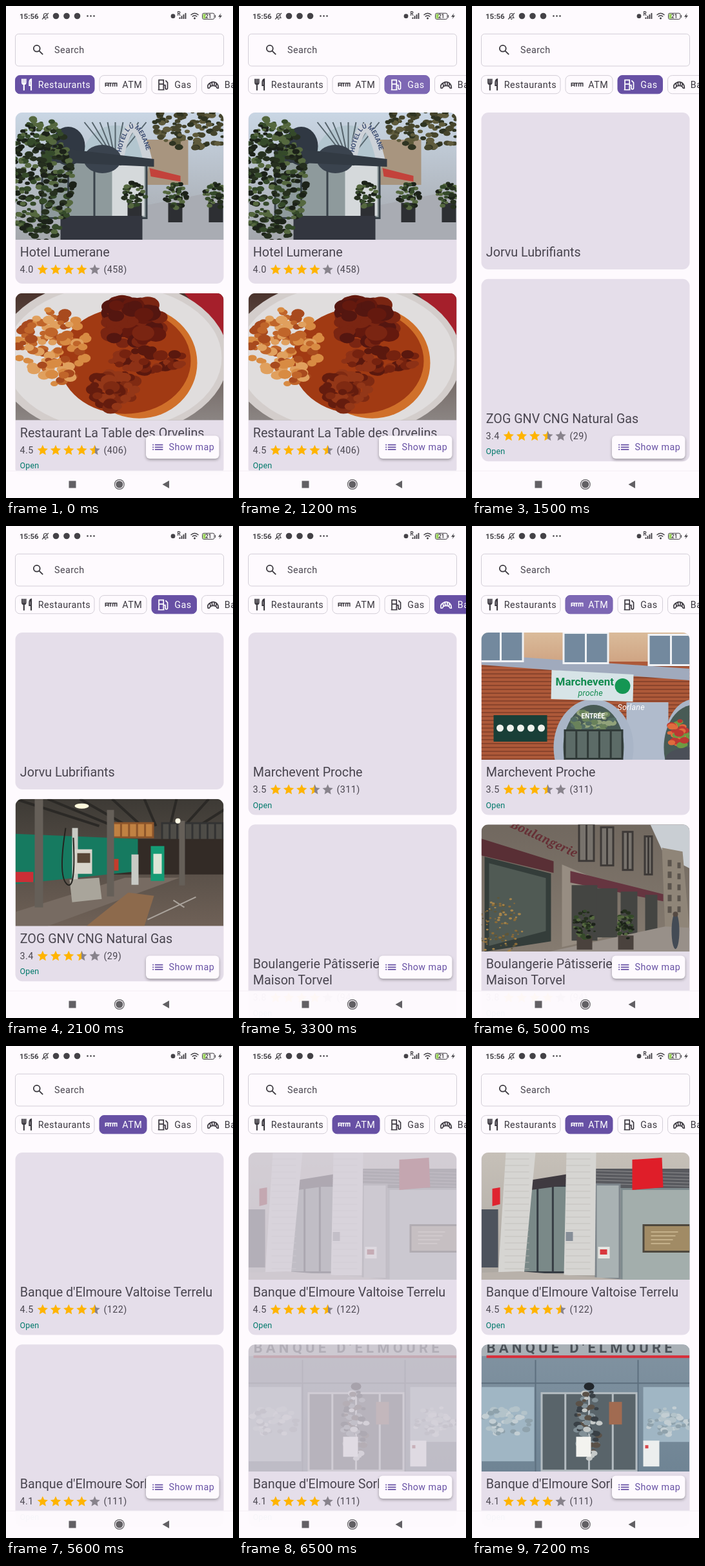
An HTML page that plays this animation: 352x762 px, repeating every 8000 ms.

```html
<!DOCTYPE html>
<html lang="en">
<head>
<meta charset="utf-8">
<title>Places nearby</title>
<style>
html, body { margin: 0; width: 100%; height: 100%; overflow: hidden; background: #fefafe; }
svg { display: block; width: 100vw; height: 100vh; }
text { font-family: Roboto, Arial, sans-serif; white-space: pre; }
.body { font-size: 14.3px; letter-spacing: .45px; }
.title { font-size: 19.7px; }
.small { font-size: 12.5px; letter-spacing: .2px; }
.status { font-size: 11.5px; font-weight: 700; }
.tiny { font-size: 8.2px; font-weight: 700; }
.sign { font-size: 17px; font-weight: 700; }
.arch { font-size: 10px; font-weight: 700; }
.script { font: italic 700 18px "Noto Serif", serif; }
.chip { color: #3b383f; }
.chip.on { color: #fff; }
.chip .bg { fill: #fefafe; stroke: #d3ced7; }
.chip.on .bg { fill: #6750a4; stroke: #6750a4; }
</style>
</head>
<body>
<svg id="stage" viewBox="0 0 352 762" xmlns="http://www.w3.org/2000/svg"></svg>
<script>
const INK = '#49454f', DARK = '#444247', PURPLE = '#6750a4', PAPER = '#fefafe', EDGE = '#d3ced7';
const CARD = '#e5deea', GOLD = '#ffb400', GREY = '#88838c', NAV = '#626064';
const CARD_W = 323, PHOTO_H = 197, LEFT = 14.5;

// Shape helpers, each returning SVG markup
const rect = (x, y, w, h, fill, more = '') =>
  `<rect x="${x}" y="${y}" width="${w}" height="${h}" fill="${fill}" ${more}/>`;
const poly = (pts, fill) => `<polygon points="${pts}" fill="${fill}"/>`;
const oval = (x, y, rx, ry, fill) => `<ellipse cx="${x}" cy="${y}" rx="${rx}" ry="${ry}" fill="${fill}"/>`;
const disc = (x, y, r, fill) => oval(x, y, r, r, fill);
const line = (d, stroke, width = 1) => `<path d="${d}" fill="none" stroke="${stroke}" stroke-width="${width}"/>`;
const text = (x, y, s, fill, cls, more = '') => `<text x="${x}" y="${y}" fill="${fill}" class="${cls}" ${more}>${s}</text>`;
const at = (x, y, inner) => `<g transform="translate(${x} ${y})">${inner}</g>`;
const rows = (n, draw) => Array.from({ length: n }, (_, i) => draw(i)).join('');
const icon = (x, y, d, width = 1.9) =>
  `<g transform="translate(${x} ${y}) scale(.896) translate(-12 -12)">${line(d, 'currentColor', width)}</g>`;

let seed = 7;
const rnd = () => (seed = seed * 16807 % 2147483647) / 2147483647;
// Ovals scattered inside an elliptic area
const scatter = (n, x, y, rx, ry, size, fills) => rows(n, i => {
  const a = rnd() * 6.283, d = Math.sqrt(rnd()), s = size * (.6 + rnd() * .7);
  return oval((x + Math.cos(a) * d * rx).toFixed(1), (y + Math.sin(a) * d * ry).toFixed(1),
    s.toFixed(1), (s * .7).toFixed(1), fills[i % fills.length]);
});
const LEAVES = ['#26301f', '#354a2a', '#1c2219', '#55683f'];

let gradients = 0;
const backdrop = (top, bottom) => {
  const id = 'sky' + gradients++;
  return `<linearGradient id="${id}" x2="0" y2="1"><stop stop-color="${top}"/><stop offset="1" stop-color="${bottom}"/></linearGradient>` +
    rect(0, 0, CARD_W, PHOTO_H, `url(#${id})`);
};
// A frame split into equal panes
const panes = (x, y, w, h, n, frame, glass) => rect(x, y, w, h, frame) +
  rows(n, i => rect(x + 3 + i * (w - 3) / n, y + 3, (w - 3) / n - 3, h - 6, glass));

// Photos, in a few flat shapes
const hotel = () => backdrop('#c9d6e4', '#a4a7ac') +
  rect(203, 42, 65, 70, '#a8957f') +
  poly('120,197 195,145 323,120 323,197', '#a9acb3') +
  oval(155, 75, 52, 55, '#b3c6cf') + rows(9, i => line(`M155 75l${-48 + i * 12} -60`, '#56646c', 2)) +
  line('M162 66Q183 -26 207 82', '#cdd2d8', 14) +
  `<path id="arch" d="M164 62Q183 -22 210 82" fill="none"/>
   <text class="arch" fill="#3e4f74"><textPath href="#arch">HOTEL LUMERANE</textPath></text>` +
  panes(40, 75, 165, 90, 4, '#39434a', '#8e9a9c') + rect(150, 82, 50, 78, '#d5d9db') +
  oval(82, 52, 26, 30, '#303843') + oval(135, 72, 29, 22, '#3a434e') + poly('40,52 215,72 215,84 40,76', '#323a43') +
  poly('208,86 256,98 256,107 210,99', '#c3423b') +
  scatter(160, 280, 15, 70, 42, 5, ['#46452c', '#2f3422', '#5f5b3c']) +
  rows(3, i => rect(174 + i * 63, 140, 22, 30, '#2d2f33') + scatter(45, 185 + i * 63, 128, 18, 20, 4, LEAVES)) +
  rect(70, 160, 127, 37, '#33363f') + scatter(340, 38, 105, 52, 98, 5, LEAVES);

const stew = () => backdrop('#4a332c', '#8b8583') + poly('262,0 323,0 323,70', '#a51f2b') +
  oval(150, 100, 180, 122, '#d3cdcb') + oval(152, 100, 168, 112, '#e0dddd') +
  oval(192, 108, 90, 86, '#d0702a') + oval(170, 105, 102, 82, '#a13a13') +
  scatter(110, 58, 85, 56, 60, 8, ['#d88b43', '#c0652a', '#e0a05e', '#a84a1e']) +
  scatter(70, 180, 45, 46, 34, 14, ['#64190e', '#7a2512', '#541610']) +
  scatter(60, 205, 105, 58, 18, 9, ['#75220f', '#8d3116', '#5a180e']) +
  scatter(60, 152, 148, 34, 32, 10, ['#7f2a12', '#933718', '#641c0e']);

const pumps = () => backdrop('#3d3a35', '#6f6157') +
  rows(8, i => line(`M${i * 50} 0L${130 + i * 22} 42`, '#2b2926', 4)) +
  panes(150, 36, 65, 25, 5, '#8c552b', '#c08142') + panes(226, 36, 97, 30, 8, '#333', '#4e4c47') +
  rect(150, 62, 173, 55, '#332b26') + poly('0,54 190,62 190,112 0,132', '#167a60') +
  poly('0,175 170,122 255,122 50,197 0,197', '#776b62') + poly('110,197 175,145 215,150 200,197', '#8d6a4c') +
  line('M205 187L280 152M245 157L262 168', '#aaa39c', 2) +
  rows(3, i => rect(30 + i * 112, i * 17, 13 - i * 2, 168 - i * 34, '#655f58')) +
  rect(0, 113, 28, 16, '#cb2e36') + rect(153, 93, 7, 18, '#c43c2c') +
  rect(88, 45, 9, 89, '#c9cac4') + rect(91, 78, 28, 38, '#d8d5cb') + rect(96, 84, 20, 15, '#584636') +
  poly('84,125 130,122 134,155 88,160', '#a9a59b') + line('M78 45Q66 120 80 132T90 60', '#24231f', 2) +
  rect(180, 86, 11, 47, '#c8cac5') + rect(210, 73, 21, 54, '#159b75') + rect(214, 85, 13, 31, '#dce5d6') +
  oval(103, 11, 11, 4, '#fff9dd') + disc(252, 34, 4, '#fffbe5');

const market = () => backdrop('#dabb9a', '#ad5939') +
  rect(0, 45, CARD_W, 152, '#ad5939') + rows(25, i => line(`M0 ${52 + i * 6}H${CARD_W}`, '#7f3e29', 1.4)) +
  poly('0,34 323,56 323,74 0,50', '#a0aabd') +
  rows(3, i => panes(i * 132 - 6, i * 3 - 4, 72, 50, 2, '#f0f2f5', '#73899e')) +
  poly('225,108 290,108 290,197 225,197', '#b0bbcc') +
  rows(2, i => oval(174 + i * 156, 178, 62 - i * 14, 75, '#a9b5c7') + oval(174 + i * 156, 178, 47, 66, '#485b55')) +
  scatter(70, 174, 138, 32, 18, 5, ['#69825b', '#91a27a', '#536c64']) + panes(128, 150, 92, 47, 5, '#303a38', '#5c6b67') +
  scatter(40, 306, 158, 16, 22, 6, ['#bd3832', '#6e9a43', '#df6c3d']) + oval(323, 197, 38, 19, '#4b4f58') +
  poly('109,58 236,65 235,107 108,103', '#d7e4e7') +
  text(115, 82, 'Marchevent', '#118b4f', 'sign', 'textLength="84"').replace('textLength="84"', '') +
  text(150, 98, 'proche', '#118b4f', 'small', 'font-style="italic"') + disc(219, 83, 12, '#159653') +
  rect(19, 128, 83, 41, '#193f37') + rows(5, i => disc(29 + i * 16, 148, 5.5, '#eef1ec')) +
  text(155, 133, 'ENTRÉE', '#fff', 'arch') + text(211, 120, 'Sorlane', '#fff', 'small', 'font-style="italic"');

const bakery = () => backdrop('#71685f', '#857b70') + poly('262,0 323,0 323,68 284,48', '#c9ced3') +
  poly('280,36 312,42 323,165 285,165', '#8f8578') +
  rows(5, i => rect(289, 55 + i * 18, 6, 10, '#5b544d') + rect(304, 59 + i * 17, 5, 9, '#5b544d')) +
  rows(4, i => panes(150 + i * 34, i * 7 - 4, 26 - i * 4, 62, 2, '#3d3937', '#77726c')) +
  text(44, 4, 'Boulangerie', '#662f35', 'script', 'transform="rotate(25 44 4)"') +
  poly('0,22 112,57 112,75 0,48', '#592f35') + poly('5,50 108,76 108,181 5,197', '#343d3a') + poly('12,60 100,83 100,165 12,188', '#505a54') +
  poly('125,62 187,88 187,176 125,190', '#978d82') + poly('138,72 282,108 282,119 138,90', '#663540') +
  rows(4, i => rect(140 + i * 38, 94 + i * 5, 40 - i * 7, 86 - i * 10, '#444542')) +
  poly('105,197 285,158 323,160 323,197', '#989089') +
  rows(2, i => rect(148 + i * 64, 172, 24, 22, '#4a423d') + scatter(60, 160 + i * 63, 156, 18 - i * 5, 22, 3, LEAVES)) +
  scatter(110, 30, 160, 34, 50, 2, ['#8a6b38', '#5f5638', '#a6844a']) +
  oval(301, 165, 6, 28, '#434b55') + disc(301, 139, 4, '#554a43');

const branch = () => backdrop('#c6c0b8', '#aca7a1') + rect(0, 88, 26, 90, '#4d535d') + poly('17,56 29,54 29,80 17,83', '#df2430') +
  panes(62, 50, 74, 137, 3, '#363c43', '#7a8988') + poly('62,45 136,33 136,50 62,60', '#3f3a40') +
  rect(176, 25, 147, 30, '#595a5f') + rows(5, i => line(`M178 ${28 + i * 5}L323 ${32 + i * 5}`, '#8c8c8e')) +
  panes(176, 48, 40, 149, 1, '#7d858b', '#a9b2b3') + panes(216, 55, 110, 145, 1, '#7d8a8d', '#a3aeac') +
  rows(2, i => poly(`${38 + i * 94},0 ${84 + i * 94},0 ${66 + i * 110},190 ${26 + i * 102},190`, '#d6d5d2') +
    rows(19, j => line(`M${36 + i * 95} ${j * 10}h38`, '#bab9b7', .7))) +
  panes(250, 111, 78, 44, 1, '#4e483e', '#a18b65') + rows(4, i => rect(263, 122 + i * 6, 42 - i * 4, 2, '#c4b08a')) +
  rect(131, 123, 11, 14, '#868e98') + rect(181, 146, 18, 18, '#e6e6e2') + rect(184, 150, 11, 8, '#d8383d') +
  poly('0,186 60,184 225,197 0,197', '#b8b1aa') + poly('234,11 280,8 282,54 234,58', '#df1e29');

const entrance = () => backdrop('#8193a1', '#6f8494') + rect(0, 0, CARD_W, 18, '#a9b0b6') +
  at(8, 13, `<g transform="scale(1.3)">${text(0, 0, "BANQUE D'ELMOURE", '#4b5158', 'sign', 'letter-spacing="4"')}</g>`) +
  rect(8, 17, 315, 4, '#d92d39') + line('M0 60H323M84 24V197M243 24V197', '#5d6f7e', 2) +
  rows(2, i => rect(i * 251, 66, 82, 115 - i * 30, '#a0b6c4') + scatter(50, 40 + i * 250, 118, 38, 22, 5, ['#c3ced3', '#8fa2ac', '#b3c3ca'])) +
  panes(92, 74, 150, 123, 4, '#b4bcc1', '#59646a') +
  scatter(60, 165, 125, 18, 55, 5, ['#c5c9c8', '#394046', '#829097', '#5a5148']) + rect(198, 89, 20, 35, '#a16b51') +
  rect(147, 143, 23, 31, '#f3f3ef') + rect(251, 149, 25, 40, '#eceeee') + rect(254, 156, 5, 5, '#d8484d') + oval(167, 65, 8, 6, '#22272c');

// Each scene: chip tapped, list swapped in, photos faded in (ms)
const scenes = [
  { chip: 0, tap: -999, swap: 0, fade: -999, places: [
    { name: ['Hotel Lumerane'], score: 4, votes: 458, photo: hotel },
    { name: ['Restaurant La Table des Orvelins'], score: 4.5, votes: 406, open: true, photo: stew }] },
  { chip: 2, tap: 1000, swap: 1400, fade: 1540, places: [
    { name: ['Jorvu Lubrifiants'] },
    { name: ['ZOG GNV CNG Natural Gas'], score: 3.4, votes: 29, open: true, photo: pumps }] },
  { chip: 3, tap: 2800, swap: 3200, fade: 3650, places: [
    { name: ['Marchevent Proche'], score: 3.5, votes: 311, open: true, photo: market },
    { name: ['Boulangerie Pâtisserie', 'Maison Torvel'], score: 3.8, votes: 94, open: true, photo: bakery }] },
  { chip: 1, tap: 4800, swap: 5600, fade: 6450, places: [
    { name: ["Banque d'Elmoure Valtoise Terrelu"], score: 4.5, votes: 122, open: true, photo: branch },
    { name: ["Banque d'Elmoure Sorlane"], score: 4.1, votes: 111, open: true, photo: entrance }] }
];
const LOOP = 8000, FADE = 650, RIPPLE = 300;

// Cards
const starPts = rows(10, i => {
  const a = i * Math.PI / 5, r = i % 2 ? 4 : 8.6;
  return `${(Math.sin(a) * r).toFixed(2)},${(.6 - Math.cos(a) * r).toFixed(2)} `;
});
const stars = (score, y) => rows(5, i => {
  const fill = score >= i + .8 ? GOLD : score >= i + .3 ? 'url(#half)' : GREY;
  return at(42.3 + i * 20.2, y, poly(starPts, fill));
});

const cardHeight = p => 218 + p.name.length * 25 + (p.score ? 22 : 0) + (p.open ? 17.5 : 0);
const card = (p, top) => {
  const y = 198.3 + p.name.length * 25;
  return at(LEFT, top, rect(0, 0, CARD_W, cardHeight(p), CARD, 'rx="11"') +
    (p.photo ? `<g clip-path="url(#top)"><g class="photo">${p.photo()}</g></g>` : '') +
    rows(p.name.length, i => text(7.3, 223.3 + i * 25, p.name[i], INK, 'title')) +
    (p.score ? text(7, y + 25, p.score.toFixed(1), INK, 'body') + stars(p.score, y + 19.7) + text(137, y + 25, `(${p.votes})`, INK, 'body') : '') +
    (p.open ? text(7, y + 48.2, 'Open', '#00796b', 'small') : ''));
};
const drawList = ({ places: [a, b] }) => `<g class="list">${card(a, 165)}${card(b, 179.7 + cardHeight(a))}</g>`;

// Chips sit in a row; icons use a 24-unit grid
const chips = [
  ['Restaurants', 122.5, 'M4 2v6.5q0 3 3 3t3-3V2M7 2v20M19.5 22V3q-3 1-3 6v4.5h3', 2.4],
  ['ATM', 73, 'M2.5 15.5v-6h5v6M2.5 13h5M8.5 9.5h5M11 9.5v6M15 15.5v-6h7v6M18.5 9.5v6', 1.7],
  ['Gas', 69.5, 'M3 21h11M4.5 21V4h8v17M4.5 11h8M12.5 13h3v5a2 2 0 0 0 4 0V8.5L16 5'],
  ['Bakery', 90, 'M3 18q-2-6 4-9t10 0t4 9q-3 1-4-3-5-2-10 0-1 4-4 3zM7.5 15L6 9M10.5 14l-1-7M13.5 14l1-7M16.5 15L18 9']
];
let chipX = LEFT;
const drawChip = ([label, w, d, weight], i) => {
  const x = chipX;
  chipX += w + 8;
  return `<g class="chip">${rect(x, 107.6, w, 28.2, '', 'rx="7" class="bg"')}
    <clipPath id="chip${i}">${rect(x, 107.6, w, 28.2, '', 'rx="7"')}</clipPath>
    <circle class="ripple" cx="${Math.min(x + w / 2, 332)}" cy="121.7" fill="#b9a8e0" clip-path="url(#chip${i})"/>
    ${icon(x + 17.8, 121.7, d, weight)}${text(x + 35.3, 127, label, 'currentColor', 'body')}</g>`;
};

const statusBar = () => text(21, 20, '15:56', DARK, 'status') +
  line('M58 18.5h7l-1.2-2v-2q-.3-3-2.8-3t-2.6 3v2zM60 20.5h2.5M56 20.5L66 11', DARK, 1.1) +
  rows(3, i => disc(77.5 + i * 16.5, 15.5, 4.8, DARK) + disc(126.5 + i * 5, 15.5, 1.3, DARK)) +
  disc(259, 15.7, 3.4, DARK) + text(265.5, 15, 'R', DARK, 'tiny') +
  rows(4, i => rect(268.5 + i * 3, 17.5 - i * 2.2, 1.9, 2.5 + i * 2.2, DARK)) +
  line('M286.5 14q6-5.5 12 0M288.7 16.5q3.8-3.5 7.6 0', DARK, 1.4) + disc(292.5, 19, 1.5, DARK) +
  rect(304.5, 11.2, 18.5, 9.3, PAPER, `rx="2.2" stroke="${DARK}"`) + rect(305.5, 12.2, 4, 7.3, '#9bd45c') +
  text(309, 19, '21', DARK, 'tiny') + line('M324.5 14v4', DARK) + poly('333.5,11 329,16.7 332,16.7 330.5,20.5 335,14.7 332,14.7', DARK);

const searchBox = () => rect(LEFT, 43.3, CARD_W, 49.7, 'none', `rx="5" stroke="${EDGE}"`) +
  `<g color="#3b383f">${icon(50, 68, 'M14 14l6 6M15 9.5a5.5 5.5 0 1 0-11 0a5.5 5.5 0 1 0 11 0', 2)}</g>` +
  text(75, 73, 'Search', INK, 'body');

const mapButton = () => rect(217, 665.5, 113.5, 35.5, PAPER, 'rx="6" style="filter:drop-shadow(0 2px 2px rgba(0,0,0,.32))"') +
  `<g color="${PURPLE}">${icon(235.3, 683.3, rows(3, i => `M3 ${8 + i * 4}h2m2 0h14`), 2)}</g>` +
  text(252.5, 688.3, 'Show map', PURPLE, 'body');

const navBar = () => rect(0, 720, 352, 42, PAPER, 'opacity=".97"') + line('M0 720H352', '#f3eef4') +
  rect(97.5, 735.5, 11, 11, NAV) + disc(175.8, 741, 8, NAV) + disc(175.8, 741, 6.8, PAPER) + disc(175.8, 741, 5.6, NAV) +
  poly('242.5,741 253,735 253,747', NAV);

const stage = document.getElementById('stage');
stage.innerHTML = `<defs>
  <linearGradient id="half"><stop offset=".5" stop-color="${GOLD}"/><stop offset=".5" stop-color="${GREY}"/></linearGradient>
  <clipPath id="top">${rect(0, 0, CARD_W, 30, '', 'rx="11"')}${rect(0, 11, CARD_W, PHOTO_H - 11, '')}</clipPath></defs>` +
  rect(0, 0, 352, 762, PAPER) + scenes.map(drawList).join('') +
  statusBar() + searchBox() + chips.map(drawChip).join('') + mapButton() + navBar();

const all = (root, sel) => [...root.querySelectorAll(sel)];
const listEls = all(stage, '.list'), chipEls = all(stage, '.chip'), ripples = all(stage, '.ripple');
const photos = listEls.map(el => all(el, '.photo'));
const clamp = v => Math.max(0, Math.min(1, v));
const latest = (key, t) => scenes.filter(s => s[key] <= t).pop();

function draw(t) {
  const scene = latest('swap', t), shown = scenes.indexOf(scene);
  listEls.forEach((el, i) => el.style.display = i === shown ? '' : 'none');
  const p = clamp((t - scene.fade) / FADE), eased = 1 - (1 - p) ** 3;
  photos[shown].forEach(el => {
    el.style.opacity = clamp(p * 4);
    el.style.filter = p < 1 ? `brightness(${.85 + .15 * eased}) saturate(${.3 + .7 * eased})` : 'none';
  });

  // The ripple starts on touch; the selection follows shortly after
  const chosen = latest('tap', t - 60).chip, touched = latest('tap', t), age = t - touched.tap;
  chipEls.forEach((el, i) => el.classList.toggle('on', i === chosen));
  ripples.forEach((el, i) => {
    el.setAttribute('r', i === touched.chip ? 10 + 55 * clamp(age / 220) : 0);
    el.setAttribute('opacity', .4 * clamp((RIPPLE - age) / 150));
  });
}

const begin = performance.now();
function tick() {
  draw((performance.now() - begin) % LOOP);
  requestAnimationFrame(tick);
}
tick();
</script>
</body>
</html>
```
